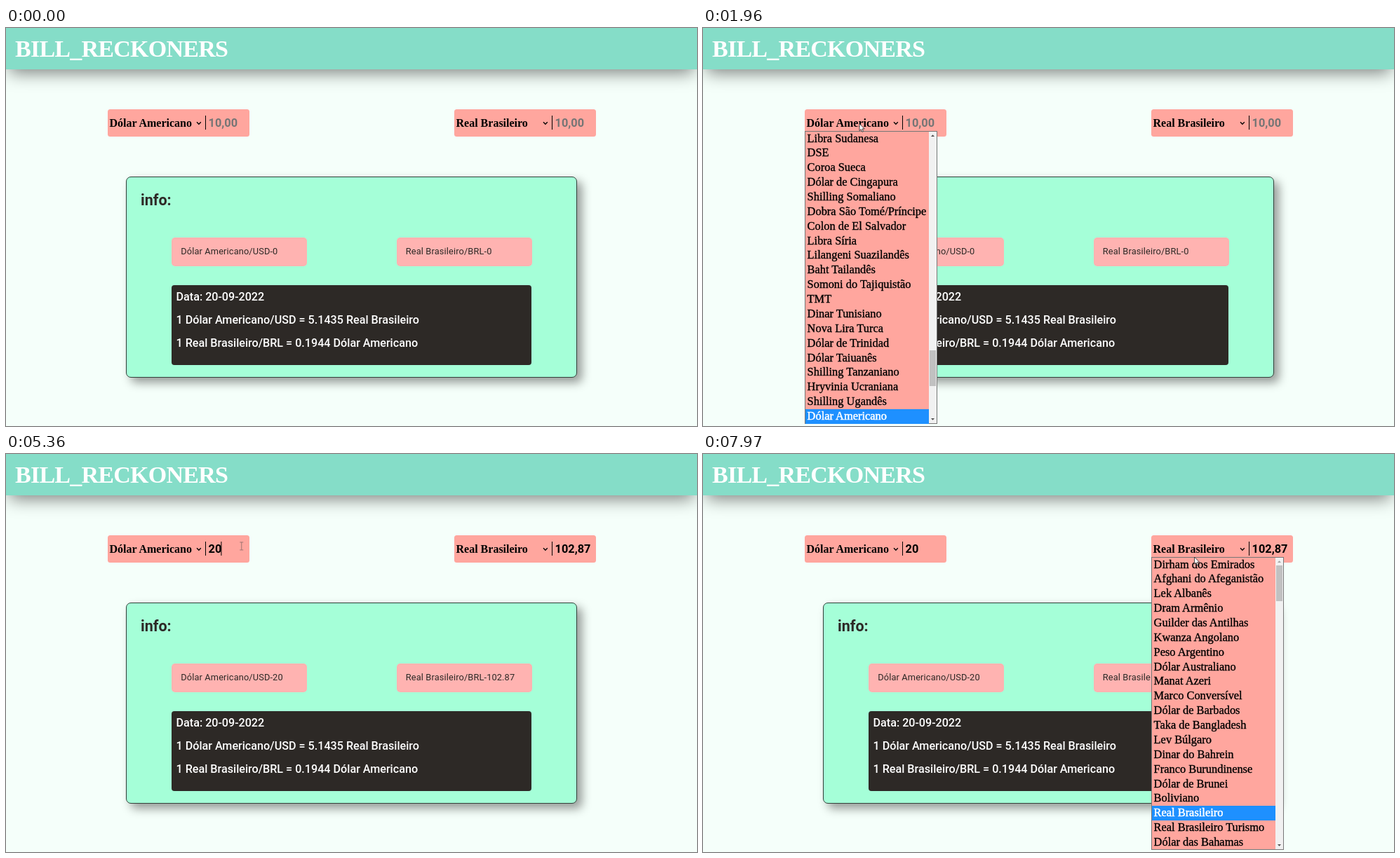
These frames come from a looping animation (985 by 568 pixels, 8000 ms). An HTML page:

```html
<!DOCTYPE html>
<html lang="pt-BR">
<head>
<meta charset="utf-8">
<title>Bill reckoners</title>
<style>
  html, body { margin: 0; width: 100%; height: 100%; overflow: hidden; }
  body { position: relative; background: #f5fffa; color: #2d2926; font-family: Roboto, sans-serif; }
  body *, svg { position: absolute; box-sizing: border-box; }
  header { left: 0; top: 0; width: 985px; height: 58.5px; background: #85ddc8;
           box-shadow: 0 10px 24px -5px rgba(0, 0, 0, .5); }
  h1 { margin: 0; left: 13px; top: 10px; color: #fff; white-space: nowrap;
       font: bold 34px/40px "Liberation Serif", serif; letter-spacing: -.75px; }
  .coin { top: 116px; width: 202px; height: 39px; border-radius: 3.5px; background: #ffa69e; color: #000; }
  .coin b { left: 2.5px; top: 0; font: bold 16px/39px "Liberation Serif", serif; white-space: nowrap; }
  .coin svg { left: 126px; top: 17px; }
  .coin hr { margin: 0; border: 0; left: 139px; top: 9px; width: 1px; height: 20px; background: #000; }
  .amount { left: 143.5px; top: 0; font-weight: 700; font-size: 16.35px; line-height: 39px; }
  .empty { color: #757575; }
  #caret { top: 125px; width: 1px; height: 20px; background: #000; }
  #info { left: 171px; top: 212px; width: 643px; height: 287px; border: 1px solid #333f3a; border-radius: 7px;
          background: #a5ffd8; box-shadow: 7px 7px 14px rgba(0, 0, 0, .4); }
  h2 { margin: 0; left: 192px; top: 230px; font-size: 21.5px; line-height: 31px; }
  .card { top: 299px; width: 193px; height: 40.5px; padding-left: 13.3px; border-radius: 5px; background: #ffb3b1;
          font-size: 12.8px; line-height: 40px; letter-spacing: .13px; white-space: nowrap; }
  #rates { left: 236px; top: 366.5px; width: 513px; height: 114px; border-radius: 4px; background: #2d2926; color: #fff; }
  #rates p { margin: 0; left: 6.5px; font-weight: 500; font-size: 16.15px; line-height: 30px; white-space: nowrap; }
  .list { top: 146.5px; width: 189px; height: 418.5px; border: 1px solid #767676; background: #ffa69e; color: #000; }
  .list p { margin: 0; left: 0; width: 176px; height: 20.87px; padding-left: 2.6px; white-space: nowrap;
            font: 16.4px/20.87px "Liberation Serif", serif; -webkit-text-stroke: .35px; }
  .list .on { background: #1e90ff; color: #fff; -webkit-text-stroke: .5px; }
  .bar { right: 0; top: 0; width: 11px; height: 100%; background: #f1f1f1; }
  .bar i { left: 1px; width: 9px; height: 51px; background: #c1c1c1; }
  .bar svg { left: 0; }
  #click { width: 17px; height: 17px; border-radius: 50%; background: #f9c63c; }
  #arrow, #beam { left: 0; top: 0; overflow: visible; }
</style>
</head>
<body>
<header><h1>BILL_RECKONERS</h1></header>

<div id="info"></div>
<h2>info:</h2>
<div class="card" id="cardA" style="left:236px"></div>
<div class="card" id="cardB" style="left:556.5px"></div>
<div id="rates">
  <p style="top:2px">Data: 20-09-2022</p>
  <p style="top:35px">1 Dólar Americano/USD = 5.1435 Real Brasileiro</p>
  <p style="top:68px">1 Real Brasileiro/BRL = 0.1944 Dólar Americano</p>
</div>

<div class="coin" style="left:145px">
  <b>Dólar Americano</b>
  <svg width="8" height="6"><path d="M1 1.2 3.9 4.2 6.8 1.2" fill="none" stroke="#000" stroke-width="1.3"/></svg>
  <hr><span class="amount" id="amountA"></span>
</div>
<div class="coin" style="left:639px">
  <b>Real Brasileiro</b>
  <svg width="8" height="6"><path d="M1 1.2 3.9 4.2 6.8 1.2" fill="none" stroke="#000" stroke-width="1.3"/></svg>
  <hr><span class="amount" id="amountB"></span>
</div>
<div id="caret"></div>

<div class="list" id="listA" style="left:145px"></div>
<div class="list" id="listB" style="left:639px"></div>

<div id="click"></div>
<svg id="arrow" width="10" height="14"><path d="M.5.5V10.6L2.8 8.5 4.4 12.3 6.1 11.6 4.5 7.9H7.7Z" fill="#fff" stroke="#222" stroke-width=".8"/></svg>
<svg id="beam" width="6" height="12"><path d="M-2.5-5.5H2.5M0-5.5V5.5M-2.5 5.5H2.5" fill="none" stroke="#8a6a67" stroke-width=".8"/></svg>

<script>
const $ = id => document.getElementById(id);
const PERIOD = 8000;

const namesA = `Libra Sudanesa,DSE,Coroa Sueca,Dólar de Cingapura,Shilling Somaliano,Dobra São Tomé/Príncipe,
Colon de El Salvador,Libra Síria,Lilangeni Suazilandês,Baht Tailandês,Somoni do Tajiquistão,TMT,Dinar Tunisiano,
Nova Lira Turca,Dólar de Trinidad,Dólar Taiuanês,Shilling Tanzaniano,Hryvinia Ucraniana,Shilling Ugandês,Dólar Americano`;
const namesB = `Dirham dos Emirados,Afghani do Afeganistão,Lek Albanês,Dram Armênio,Guilder das Antilhas,Kwanza Angolano,
Peso Argentino,Dólar Australiano,Manat Azeri,Marco Conversível,Dólar de Barbados,Taka de Bangladesh,Lev Búlgaro,
Dinar do Bahrein,Franco Burundinense,Dólar de Brunei,Boliviano,Real Brasileiro,Real Brasileiro Turismo,Dólar das Bahamas`;

function fillList(id, names, selected, thumbTop, upColor) {
  const rows = names.split(",").map((name, i) =>
    `<p${i === selected ? ' class="on"' : ""} style="top:${i * 20.87}px">${name.trim()}</p>`);
  const tip = (top, path, color) =>
    `<svg width="11" height="11" style="top:${top}px"><path d="${path}" fill="${color}"/></svg>`;
  $(id).innerHTML = rows.join("") + `<div class="bar"><i style="top:${thumbTop}px"></i>` +
    tip(0, "M3 7 5.5 4.2 8 7Z", upColor) + tip(405, "M3 4 5.5 6.8 8 4Z", "#505050") + "</div>";
}
fillList("listA", namesA, 19, 312, "#505050");
fillList("listB", namesB, 17, 11, "#a3a3a3");

// Pointer moves: first step, last step, number of steps, goal x, goal y, bow
const origin = [920, 575];
const moves = [
  [260, 950, 11, 226, 129, 0],
  [1480, 1610, 3, 220, 136, 0],
  [1890, 1960, 2, 222.5, 136, 0],
  [2380, 2770, 7, 331, 133, 0],
  [3040, 3110, 2, 324.5, 133, 0],
  [5360, 5910, 9, 653, 122, -11],
  [6110, 6320, 4, 658, 127, 0],
  [6460, 6730, 4, 659, 127, 0],
  [6890, 7500, 10, 703, 132, 0],
  [7900, 7970, 2, 700, 146.5, 0]
];

function pointer(t) {
  let [x, y] = origin;
  for (const [a, b, n, gx, gy, bow] of moves) {
    if (t < a) break;
    const k = Math.min(n, Math.floor((t - a) / (b - a) * (n - 1) + 1e-6) + 1) / n;
    const p = k * k * (3 - 2 * k);
    x += (gx - x) * p;
    y += (gy - y) * p + bow * Math.sin(Math.PI * p);
  }
  return [x, y];
}

const within = (t, a, b) => t >= a && t < b;
const show = (id, on) => { $(id).style.visibility = on ? "visible" : "hidden"; };
const place = (id, x, y) => { $(id).style.transform = `translate(${x}px, ${y}px)`; };
function setText(id, text) { if ($(id).textContent !== text) $(id).textContent = text; }

function draw(t) {
  const typed = t < 4170 ? "" : t < 4310 ? "2" : "20";
  const result = typed ? String(+(typed * 5.1435).toFixed(4)) : "0";
  setText("amountA", typed || "10,00");
  setText("amountB", typed ? result.replace(".", ",") : "10,00");
  for (const id of ["amountA", "amountB"]) $(id).classList.toggle("empty", !typed);
  setText("cardA", "Dólar Americano/USD-" + (typed || "0"));
  setText("cardB", "Real Brasileiro/BRL-" + result);

  // The caret blinks about every 530 ms and restarts with each key
  const since = t < 4170 ? 2780 : t < 4310 ? 4170 : 4305;
  const blinkOn = Math.floor((t - since) / 528) % 2 === 0;
  show("caret", within(t, 2780, 7570) && blinkOn);
  place("caret", 288 + 9.2 * typed.length, 0);

  show("listA", within(t, 1160, 2770));
  show("listB", t >= 7570);

  const [x, y] = pointer(t);
  const visible = t >= 260 && !within(t, 4170, 5360);
  const inField = t >= 2770 && within(x, 286, 347);
  show("arrow", visible && !inField);
  show("beam", visible && inField);
  place("arrow", x, y);
  place("beam", x, y);

  show("click", within(t, 1100, 1160) || within(t, 2770, 2840) || within(t, 7570, 7700));
  place("click", x - 8.5, y - 8.8);
}

function tick() {
  draw(performance.now() % PERIOD);
  requestAnimationFrame(tick);
}
tick();
</script>
</body>
</html>
```
